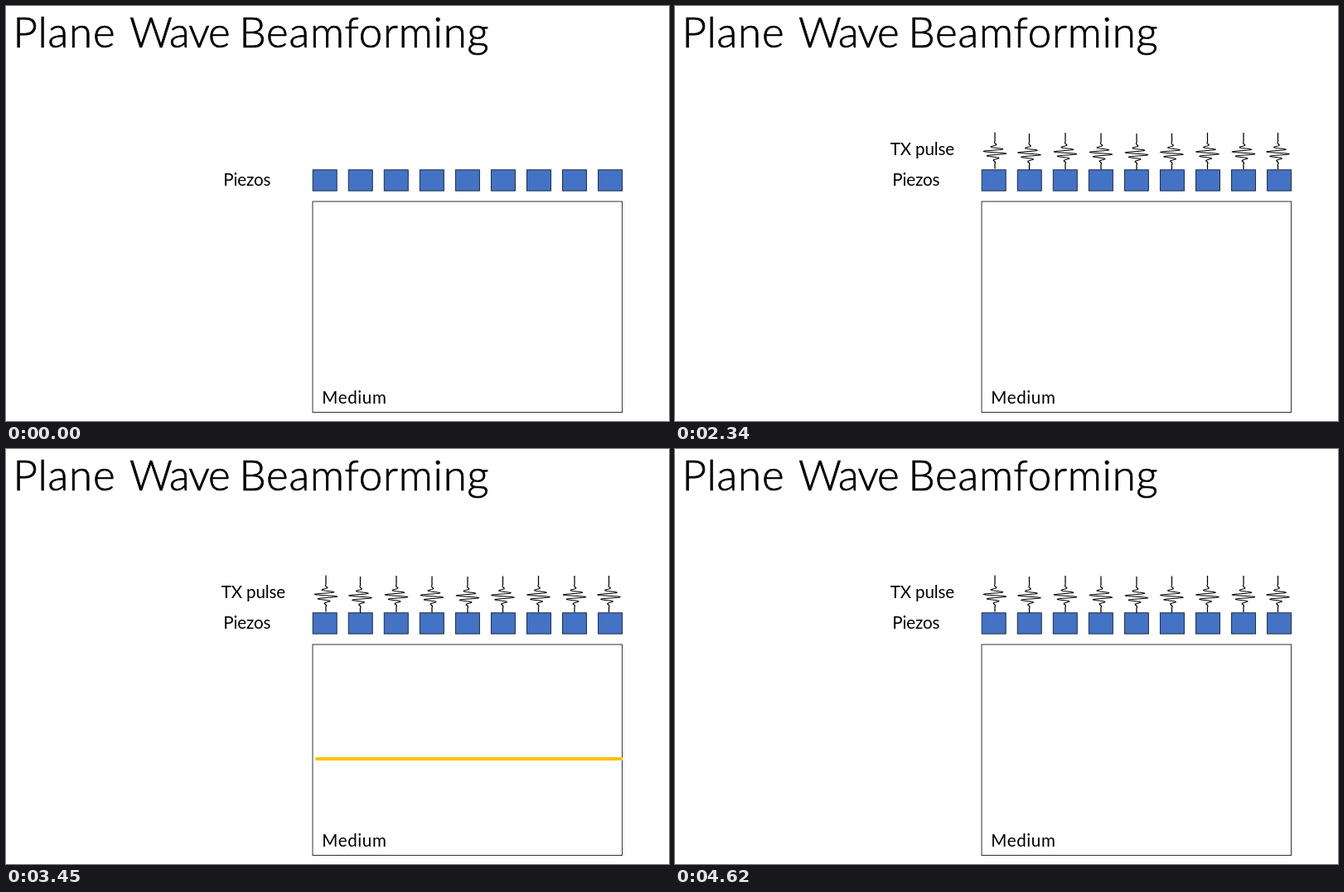
Animation, 800 px wide and 501 px high, one loop 4.89 s. Source, as an HTML page:

```html
<!DOCTYPE html>
<html lang="en">
<head>
<meta charset="utf-8">
<title>Plane Wave Beamforming</title>
<style>
  html, body { margin: 0; width: 100%; height: 100%; overflow: hidden; background: #fff; }
  svg { display: block; width: 100%; height: 100%; }
  text { font-family: Lato, Carlito, "Open Sans", sans-serif; font-size: 20.6px; letter-spacing: -.15px; }
  .title { font-size: 51px; font-weight: 300; letter-spacing: .8px; stroke: #000; stroke-width: .7; }
  .tight { letter-spacing: -1.2px; }
  .medium { letter-spacing: .6px; }
  #piezos rect { fill: #4472c4; stroke: #1c2c48; }
  #pulses path { fill: none; stroke: #000; stroke-width: 1.25; stroke-linejoin: round; }
</style>
</head>
<body>
<svg viewBox="0 0 800 501">
  <text class="title" y="50"><tspan x="8.5">Plane </tspan><tspan class="tight" x="149">Wave </tspan><tspan x="281.5">Beamforming</tspan></text>
  <text x="262.3" y="216.5">Piezos</text>
  <rect x="370" y="236" width="373.5" height="254.5" fill="none" stroke="#333"/>
  <text class="medium" x="381.3" y="479.5">Medium</text>
  <g id="piezos"></g>
  <g id="pulses"><text x="259.7" y="180">TX pulse</text></g>
  <rect id="wave" width="370.5" height="4" fill="#ffc000"/>
</svg>
<script>
const LOOP = 4890, STEP = 30;
const PULSE_START = 1380, PULSE_LENGTH = 960;
const WAVE_SHOW = 2430, WAVE_START = 2580, WAVE_LENGTH = 1580, WAVE_HIDE = 4530;

const byId = id => document.getElementById(id);
const clamp = v => Math.min(1, Math.max(0, v));

function add(parent, tag, attributes) {
  const node = document.createElementNS("http://www.w3.org/2000/svg", tag);
  for (const name in attributes) node.setAttribute(name, attributes[name]);
  return parent.appendChild(node);
}

// Vertical wire with a Gaussian-windowed sine burst in the middle.
function burstPath(cx, top) {
  const points = [];
  for (let y = 0; y <= 44; y += 0.25) {
    const d = y - 24.3;
    const x = 14.3 * Math.exp(-((d / 6.6) ** 2)) * Math.sin(2 * Math.PI * d / 5.6);
    points.push((cx + x).toFixed(2) + "," + (top + y).toFixed(2));
  }
  return "M" + points.join("L");
}

const piezos = Array.from({ length: 9 }, (_, i) => ({
  cx: 384.7 + 43.05 * i,
  node: add(byId("piezos"), "rect", { x: 370.2 + 43.05 * i, y: 197.8, width: 29, height: 25.3 })
}));

const burstX = [386, 427.5, 471, 514, 557, 599.5, 642.5, 686, 727.5];
const burstDrop = [0, 1.5, .5, 1, 1.5, 1, .5, .5, .5];
burstX.forEach((x, i) => add(byId("pulses"), "path", { d: burstPath(x, 152.5 + burstDrop[i]) }));

// Constant acceleration to the midpoint, then constant deceleration.
const ease = p => p < .5 ? 2 * p * p : 1 - 2 * (1 - p) ** 2;

function draw(t) {
  byId("pulses").style.display = t >= PULSE_START ? "" : "none";

  const p = clamp((t - PULSE_START) / PULSE_LENGTH);
  const nearEnd = Math.min(p, 1 - p);
  const scale = 1 + .1 * nearEnd;
  byId("piezos").setAttribute("opacity", 1 - .5 * clamp(nearEnd / .2));
  for (const { cx, node } of piezos) {
    node.setAttribute("transform", `translate(${cx} 210.4) scale(${scale}) translate(${-cx} -210.4)`);
  }

  const travel = ease(clamp((t - WAVE_START) / WAVE_LENGTH));
  const wave = byId("wave");
  wave.style.display = t >= WAVE_SHOW && t < WAVE_HIDE ? "" : "none";
  wave.setAttribute("x", 372.3 + 2 * travel);
  wave.setAttribute("y", 230.5 + 237.5 * travel);
}

const start = performance.now();
function tick() {
  const t = (performance.now() - start) % LOOP;
  draw(Math.floor(t / STEP) * STEP);
  requestAnimationFrame(tick);
}
tick();
</script>
</body>
</html>
```
